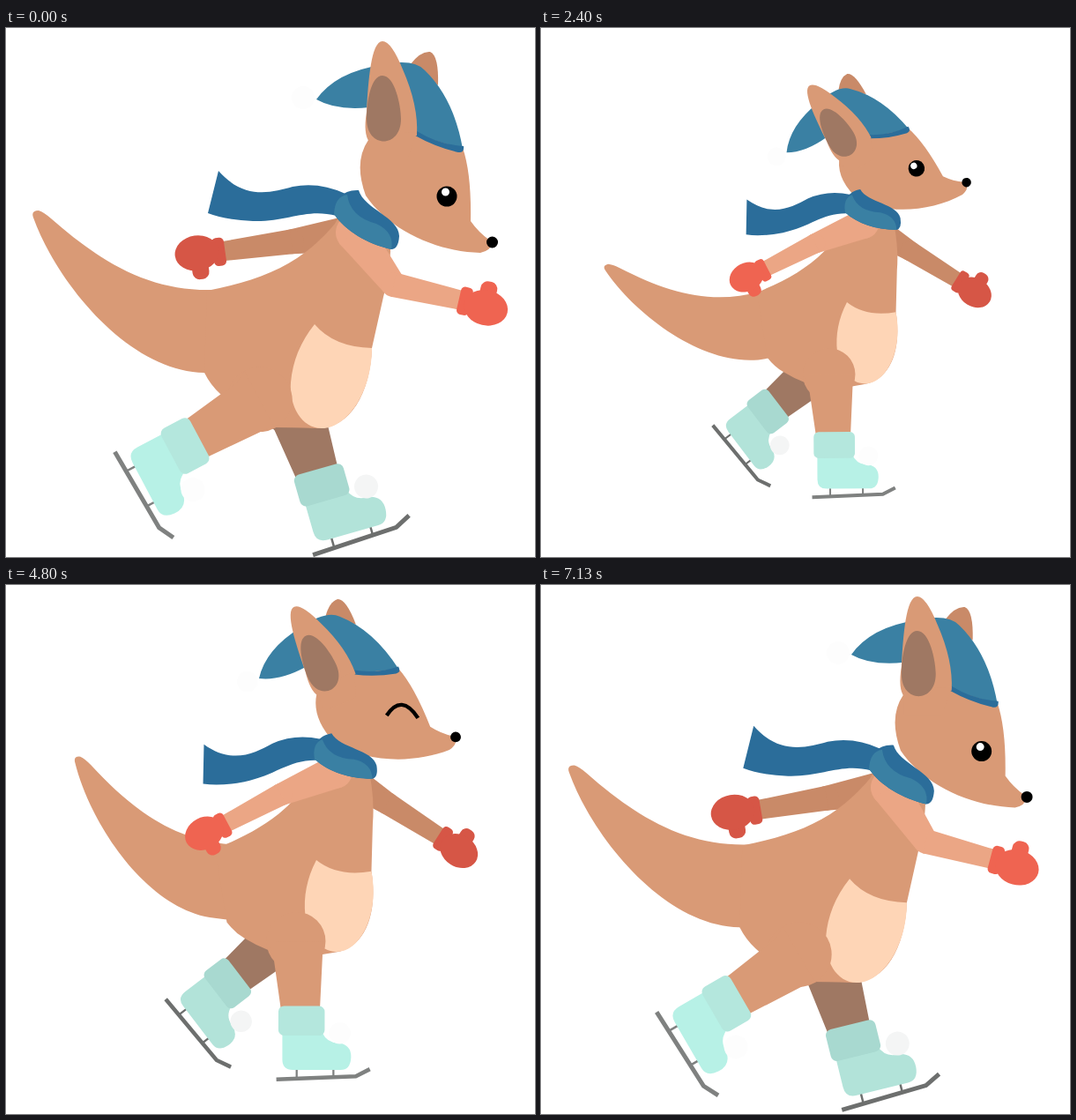
These frames come from a looping animation (600x600 px, 7.21 s). An HTML page:

```html
<!DOCTYPE html>
<html lang="en">
<head>
<meta charset="utf-8">
<title>Skating kangaroo</title>
<style>
  html, body { margin: 0; width: 100%; height: 100%; overflow: hidden; background: #fff; }
  svg { display: block; width: 100vw; height: 100vh; }
</style>
</head>
<body>
<svg id="stage" viewBox="0 0 600 600"></svg>
<script>
const FUR = '#d99a76', FAR_FUR = '#c98a68', SHADE = '#9f7863';
const HAT = '#3a80a3', NAVY = '#2b6d9a';

const path = (d, fill) => `<path d="${d}" fill="${fill}"/>`;
const dot = (x, y, r, fill) => `<circle cx="${x}" cy="${y}" r="${r}" fill="${fill}"/>`;
const group = (id, content) => `<g id="${id}">${content}</g>`;

// Leg hangs straight down from the hip at 0,0.
function leg(id, c) {
  return group(id,
    dot(2, 22, 37, c.skin) +
    path('M-35 22L-27 36L-17 106H32L36 22Z', c.skin) +
    `<path d="M3 181V194M49 181V193" stroke="${c.blade}" stroke-width="2.5"/>
     <path d="M-22.5 195L77 191L94.6 182" fill="none" stroke="${c.blade}" stroke-width="5"/>` +
    path('M-15 134H34Q40 150 56 149Q72 152 71 168Q70 183 58 183H-2Q-15 183 -15 170Z', c.boot) +
    `<rect x="-20" y="103" width="58" height="37" rx="7" fill="${c.cuff}"/>` +
    dot(57, 137, 13.5, c.pom));
}

// Arm points along +x from the shoulder at 0,0; the forearm is its own joint.
function arm(id, skin, mitt) {
  const hand = `<g transform="translate(78 0)">
    <rect x="-2" y="-16" width="14" height="32" rx="5" fill="${mitt}"/>
    <rect x="19" y="-28" width="19" height="24" rx="8" fill="${mitt}"/>
    <ellipse cx="30" cy="2" rx="25" ry="20" fill="${mitt}"/></g>`;
  return group(id,
    dot(0, 0, 21, skin) + path('M0 -21L74 -14V14L0 21Z', skin) + dot(74, 0, 14, skin) +
    group(id + 'Fore', path('M0 -14L80 -11V11L0 14Z', skin) + hand));
}

const tail = path('M31 215Q28 207 37 207Q43 209 51 216C110 268 165 299 235 297L290 300L285 392L225 391C140 390 58 290 31 215Z', FUR);

const torso =
  path('M228 298C290 286 335 268 373 222L388 196L436 225Q438 270 428 305L415 363' +
    'C413 415 390 455 352 454Q322 453 303 453Q268 438 243 415Q232 405 225 391Z', FUR) +
  path('M350 336Q372 362 415 363C415 415 385 455 358 454C335 454 321 428 323 402Q326 366 350 336Z', '#fed5b6');

const head =
  dot(337, 79, 13, '#fdfdfd') +
  path('M458 42Q470 26 481 27Q491 31 490 65Z', FAR_FUR) +
  path('M440 60L495 80L518 136Q528 165 527 219Q536 232 549 241Q553 252 538 255C490 254 435 230 408 190' +
    'Q394 152 411 127Z', FUR) +
  path('M352 81Q374 50 425 42Q462 34 475 48Q508 80 518 137L465 121L440 70L412 90Q375 94 352 81Z', HAT) +
  path('M466 117Q490 132 519 134Q520 142 513 141Q487 135 464 122Z', NAVY) +
  path('M427 15Q437 15 450 47Q468 88 466 122L412 129Q405 120 409 95C411 60 414 15 427 15Z', FUR) +
  path('M412 120L466 118L455 150L412 150Z', FUR) +
  path('M427 54C441 54 448 88 448 103C448 137 409 137 409 103C409 83 414 54 427 54Z', SHADE) +
  dot(551.5, 243, 6.5, '#000') +
  `<g transform="translate(500 191)">
     ${group('open', dot(0, 0, 11.5, '#000') + dot(-1.5, -5, 4.5, '#fff'))}
     <path id="shut" d="M-18 -6Q10 -25 17 12" fill="none" stroke="#000" stroke-width="4.8"/>
   </g>`;

const scarf =
  path('M241 162C270 195 300 187 325 180Q355 174 385 188L375 213C340 204 320 220 280 219Q250 218 229 210Z', NAVY) +
  path('M372 211C372 195 382 183 400 184C406 205 446 215 446 236Q445 251 437 251C410 245 385 230 372 211Z', NAVY) +
  path('M372 211Q373 191 387 189Q390 214 420 222Q441 232 437 251C410 245 385 230 372 211Z', HAT);

const nearLeg = { skin: FUR, boot: '#b7f1e6', cuff: '#b4e7dd', pom: '#fdfdfd', blade: '#7f8180' };
const farLeg = { skin: SHADE, boot: '#b2e3d9', cuff: '#a8d9d0', pom: '#f4f5f5', blade: '#6d6f6e' };

const $ = id => document.getElementById(id);
$('stage').innerHTML = group('body',
  arm('farArm', FAR_FUR, '#d65646') +
  leg('farLeg', farLeg) +
  group('tail', tail) + torso +
  leg('nearLeg', nearLeg) +
  arm('nearArm', '#eba685', '#ef6451') +
  group('head', head) + group('scarf', scarf));

// One stride; the loop holds two of them.
const STRIDE = 7210 / 2;
const TIMES = [0, 165, 450, 800, 1200, 1600, 2000, 2400, 2800, 3200, 3440];
const TRACKS = {
  x:     [350, 350, 350, 351, 352, 350, 348, 347, 348, 349, 350],
  y:     [336, 329, 318, 319, 312, 316, 313, 311, 320, 313, 328],
  scale: [1, 1, 1, .965, .905, .86, .82, .805, .857, .936, .99],
  head:  [0, 0, -1, -4, -11.5, -15, -18, -18.5, -13, -5, -.5],
  tail:  [0, 0, -1, 2, 17, 12, 3, -3, -3, -1, 0]
};

// Smooth cyclic curve through the track's points.
function sample(track, t) {
  const n = TIMES.length;
  const at = i => {
    const k = (i + n) % n;
    return [TIMES[k] + STRIDE * Math.floor(i / n), track[k]];
  };
  let i = n - 1;
  while (TIMES[i] > t) i--;
  const [a, b, c, d] = [at(i - 1), at(i), at(i + 1), at(i + 2)];
  const h = c[0] - b[0], u = (t - b[0]) / h;
  const m = (c[1] - a[1]) / (c[0] - a[0]) * h;
  const k = (d[1] - b[1]) / (d[0] - b[0]) * h;
  const u2 = u * u, u3 = u2 * u;
  return (2 * u3 - 3 * u2 + 1) * b[1] + (u3 - 2 * u2 + u) * m +
    (3 * u2 - 2 * u3) * c[1] + (u3 - u2) * k;
}

// Limb swing: 0 at one end of the stride, 1 at the other.
function swing(t) {
  const x = 1 - Math.abs(1 - 2 * t / STRIDE);
  const e = Math.min(1, 1.1 * Math.pow(x, .8));
  return e * e * (3 - 2 * e);
}

const set = (id, value) => $(id).setAttribute('transform', value);
const joint = (id, x, y, angle) => set(id, `translate(${x} ${y}) rotate(${angle})`);

function draw(now) {
  const t = now % STRIDE, p = swing(t);
  const early = Math.pow(p, .87), late = Math.pow(p, 1.2);
  const v = {};
  for (const key in TRACKS) v[key] = sample(TRACKS[key], t);

  set('body', `translate(${v.x} ${v.y}) rotate(${-14 * p * p}) scale(${v.scale}) translate(-350 -336)`);
  set('head', `rotate(${v.head} 427 234)`);
  set('scarf', `rotate(${-2 * p} 390 210)`);
  set('tail', `rotate(${v.tail} 245 340)`);

  // The near hip slides forward while the leg passes under the body.
  const hip = 306 + 10 * Math.sin(Math.PI * Math.sqrt(p));
  joint('nearLeg', hip, 409, 62 - 56.4 * early);
  joint('farLeg', 316, 404, -16 + 89.5 * p);

  const upper = 53 + 130 * p, fore = 13 + 173 * late;
  joint('nearArm', 395, 232, upper);
  joint('nearArmFore', 74, 0, fore - upper);
  joint('farArm', 397, 232, 172 - 148 * late);
  joint('farArmFore', 74, 0, 0);

  const blink = t > 820 && t < 1700;
  $('open').style.display = blink ? 'none' : '';
  $('shut').style.display = blink ? '' : 'none';
}

const start = performance.now();
function tick() {
  draw(performance.now() - start);
  requestAnimationFrame(tick);
}
tick();
</script>
</body>
</html>
```
